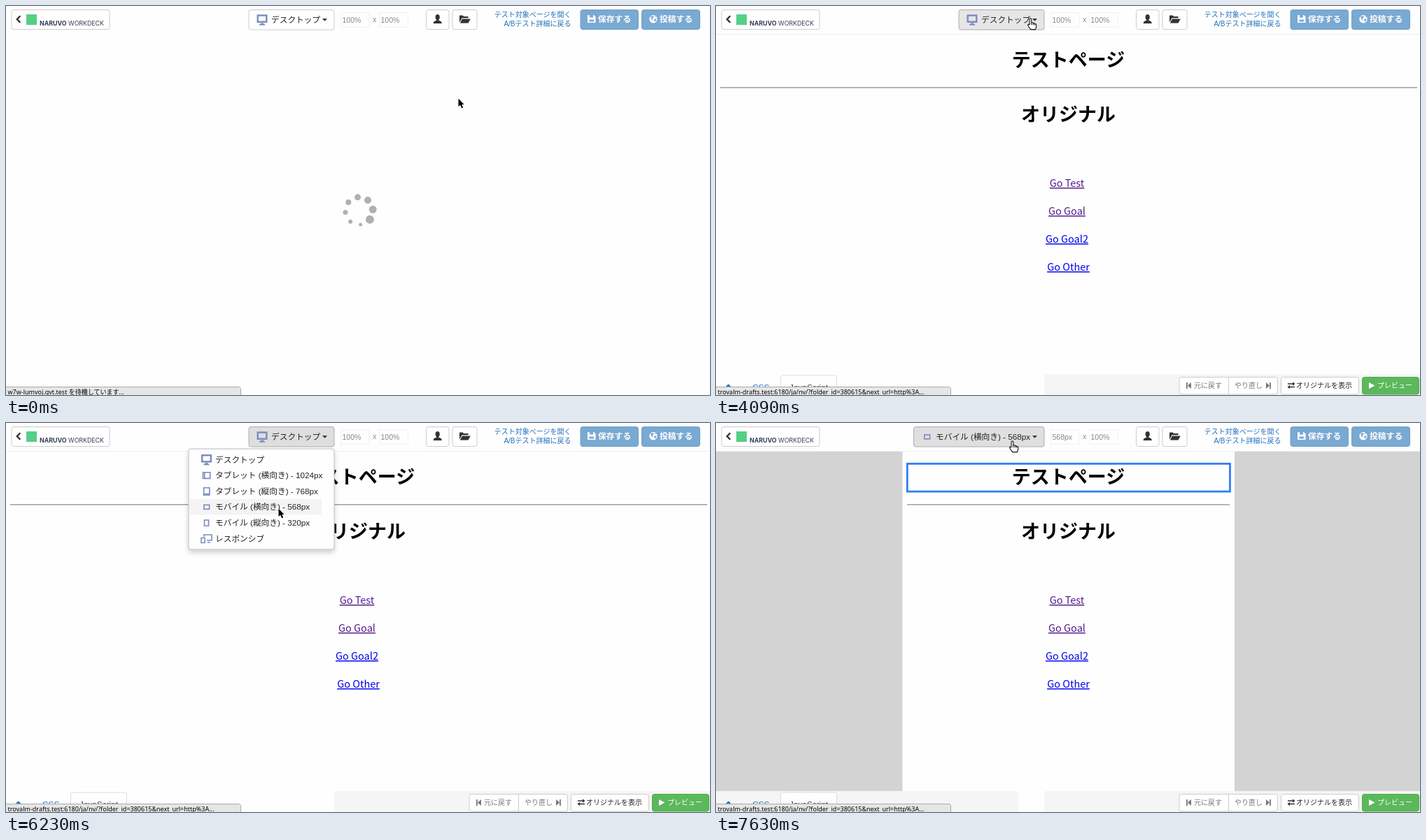
These frames come from a looping animation (1006 by 557 pixels, 8000 ms). An HTML page:

```html
<!DOCTYPE html>
<html lang="ja">
<head>
<meta charset="utf-8">
<title>Page editor</title>
<style>
  html, body { margin: 0; width: 100%; height: 100%; overflow: hidden; background: #fefefe; }
  svg { display: block; width: 1006px; height: 557px; }
  text { font-family: "Liberation Sans", "Noto Sans CJK JP", sans-serif; white-space: pre; }
  .btn { fill: #fff; stroke: #ccc; }
  .field { fill: #fefefe; stroke: #f1f1f1; }
  .num { font-size: 10.5px; fill: #888; }
  .label { font-size: 11.7px; fill: #222; }
  .nav { font-size: 10px; fill: #2171bb; text-anchor: end; }
  .main { font-size: 11.8px; font-weight: 700; fill: #fff; }
  .blue { fill: #7aa9d2; stroke: #6d9fca; }
  .small { font-size: 10px; fill: #222; }
  .dim { fill: #777; }
  .dark { fill: #333; }
  .tab { font-size: 11.8px; fill: #444; }
  .page text { font-family: "Noto Sans CJK JP", sans-serif; text-anchor: middle; }
  .page .head { font-size: 27px; font-weight: 700; }
  .link { font-size: 14.5px; text-decoration: underline 1px; text-underline-offset: 2px; fill: #0000ee; }
  .seen { fill: #551a8b; }
  .dev { fill: none; stroke: #7a8bbd; stroke-width: 1.6; }
  #statusText { font: 500 9px "Noto Sans", "Noto Sans CJK JP", sans-serif; }
</style>
</head>
<body>
<svg viewBox="0 0 1006 557">
  <defs>
    <g id="monitor" class="dev">
      <rect x="1.2" y="1.2" width="12.6" height="9.2" stroke-width="2.4"/>
      <path d="M5.2 12.2h4.6v2.2H5.2z" fill="#7a8bbd" stroke="none"/>
      <path d="M3.5 14.5h8"/>
    </g>
    <rect id="wide" class="dev" x=".8" y=".8" width="7.8" height="6"/>
    <filter id="shade" x="-10%" y="-10%" width="120%" height="125%">
      <feDropShadow dx="0" dy="4" stdDeviation="3.5" flood-opacity=".18"/>
    </filter>
  </defs>

  <g id="sides" fill="#d3d3d3">
    <rect y="41" width="266.5" height="486"/>
    <rect x="741" y="41" width="265" height="486"/>
  </g>

  <g id="page" class="page">
    <text class="head" x="503.5" y="87">テストページ</text>
    <rect id="rule" y="116.2" height="1.3" fill="#8f8f8f"/>
    <text class="head" x="503.5" y="165">オリジナル</text>
    <text class="link seen" x="501.5" y="259">Go Test</text>
    <text class="link seen" x="501.5" y="299">Go Goal</text>
    <text class="link" x="501.5" y="339">Go Goal2</text>
    <text class="link" x="503.5" y="379">Go Other</text>
  </g>
  <rect id="pick" x="273.3" y="58.3" width="461.2" fill="none" stroke="#2f7ff3" stroke-width="2.8"/>
  <g id="spinner" opacity=".3"></g>

  <!-- top bar -->
  <path id="topLine" d="M0 40.5H1006" stroke="#eee"/>
  <rect class="btn" x="8" y="5.5" width="140" height="28" rx="3"/>
  <path d="M20.3 14.2L15.8 19l4.5 4.8" fill="none" stroke="#333" stroke-width="2.4"/>
  <rect x="29" y="12" width="15" height="15" fill="#55cf86"/>
  <text x="48" y="27.5" fill="#343c58" style="font:8.8px Inter,sans-serif"><tspan font-weight="700">NARUVO</tspan> WORKDECK</text>

  <rect id="device" class="btn" y="5.5" height="28.5" rx="3"/>
  <g id="desktopLabel">
    <use href="#monitor" x="358.5" y="12.3"/>
    <text class="label" x="379" y="24">デスクトップ</text>
  </g>
  <g id="mobileLabel">
    <use href="#wide" x="297" y="16"/>
    <text class="label" x="314" y="24">モバイル (横向き) - 568px</text>
  </g>
  <path class="dark" d="M452 18h7l-3.5 3.7z"/>

  <rect class="field" x="478.5" y="9.5" width="40.5" height="20.5"/>
  <text id="widthText" class="num" x="480.5" y="23.7"></text>
  <text class="num" x="524" y="23.2">x</text>
  <rect class="field" x="533.5" y="9.5" width="41" height="20.5"/>
  <text class="num" x="535.5" y="23.7">100%</text>

  <rect class="btn" x="600.5" y="5.5" width="32.5" height="28" rx="3"/>
  <rect class="btn" x="638" y="5.5" width="35" height="28" rx="3"/>
  <g class="dark">
    <ellipse cx="616.7" cy="16" rx="3.1" ry="4"/>
    <path d="M610.6 25q0-3.6 4.6-4.6v-2h3v2q4.6 1 4.6 4.6z"/>
    <path d="M648 23.5V13.5h5l1 1.5h6.5v2.2h-9z"/>
    <path d="M648.8 24.5l3-6h12l-3.4 6z"/>
  </g>
  <text class="nav" x="807.5" y="15.6">テスト対象ページを開く</text>
  <text class="nav" x="807.5" y="29">A/Bテスト詳細に戻る</text>

  <rect class="blue" x="821" y="5.5" width="82.5" height="28" rx="3"/>
  <path d="M831 13h9l2.5 2.5v8.5h-11.5z" fill="#fff"/>
  <path d="M834 13h5v3.5h-5zM833.5 19.5h6.5v3h-6.5z" fill="#7aa9d2"/>
  <text class="main" x="846" y="23">保存する</text>
  <rect class="blue" x="908.5" y="5.5" width="83" height="28" rx="3"/>
  <circle cx="925" cy="18.7" r="5.7" fill="#fff"/>
  <path d="M921 15l4-.8 1 2-2.5 1.3 1 2-1.5 1zM926 19l3-1 .5 2-2.5 2.7zM927 14l2.3 1.5-1 1z" fill="#7aa9d2"/>
  <text class="main" x="934" y="23">投稿する</text>

  <!-- bottom bar -->
  <g id="bottom">
    <rect id="barLeft" y="527" height="30" fill="#f5f5f5"/>
    <rect x="469" y="527" width="537" height="30" fill="#f5f5f5"/>
    <path d="M13 547.5l4.7-4.5 4.7 4.5" fill="none" stroke="#2171bb" stroke-width="2.4"/>
    <text class="tab" x="52" y="549.5" style="fill:#2171bb">CSS</text>
    <path d="M92.5 558V532q0-3 3-3H169.5q3 0 3 3V558z" fill="#fefefe" stroke="#ddd"/>
    <text class="tab" x="105" y="549.5">JavaScript</text>

    <rect class="btn" x="662" y="531.5" width="140.5" height="24.5" rx="3"/>
    <path d="M732.5 531.5v24.5" stroke="#ccc"/>
    <path class="dim" d="M672 539h1.8v9H672zM679 539v9l-5-4.5zM786 539v9l5-4.5zM791 539h1.8v9H791z"/>
    <text class="small dim" x="683" y="547.3">元に戻す</text>
    <text class="small dim" x="741" y="547.3">やり直し</text>
    <rect class="btn" x="807.5" y="531.5" width="111" height="24.5" rx="3"/>
    <path class="dark" d="M817 540.2h7v-2l3.5 2.8-3.5 2.8v-2h-7zM827 544.7h-7v-2l-3.5 2.8 3.5 2.8v-2h7z"/>
    <text class="small" x="829" y="547.3">オリジナルを表示</text>
    <rect x="923.5" y="531.5" width="81" height="24.5" rx="3" fill="#5cb85c" stroke="#4cae4c"/>
    <path d="M933 539v9l8.5-4.5z" fill="#fff"/>
    <text class="small" x="945" y="547.3" style="fill:#fff">プレビュー</text>
  </g>

  <g id="menu">
    <rect x="261" y="37" width="208" height="144" rx="3" fill="#fefefe" stroke="#bbb" filter="url(#shade)"/>
    <rect id="hover" x="262" width="189" height="22.6" fill="#f4f4f4"/>
    <use href="#monitor" x="279" y="45"/>
    <g class="dev">
      <path d="M281.5 70.8h10.2v8.6h-10.2zM283.7 71v8.4"/>
      <path d="M282.6 92.8h8.2v10.4h-8.2zM282.6 101.5h8.2"/>
      <path d="M283.5 139h6v8.2h-6z"/>
      <path d="M283 163v-3h11v8h-7M279 164.5h5v7h-5zM288 171h4"/>
    </g>
    <use href="#wide" x="282" y="116.5"/>
  </g>

  <g id="status">
    <path d="M-1 558V545.5H332.5q3 0 3 3V558z" fill="#e6e6e6" stroke="#aaa"/>
    <text id="statusText" x="2.5" y="555.5"></text>
  </g>

  <g id="cursor">
    <path id="arrow" d="M0 0V11.5L2.6 9.2 4.6 13.8 6.7 12.9 4.8 8.4H8Z" stroke="#fff" paint-order="stroke"/>
    <path id="hand" d="M-1.5 8.5V1.2a1.4 1.4 0 0 1 2.8 0V5.5l2.2.3.4.8 2 .1.5.9 1.5.4.3 1.2V12l-1.3 3.6H.3L-3 11.3l-.9-2.3 1-.8zM1.3 6v3M3.8 6.6v2.6M6 7.4v2" fill="#fff" stroke="#111" stroke-width="1.1"/>
  </g>
</svg>
<script>
const LOOP = 8000;
const WAITING = "w7w-lumvoj.qvt.test を待機しています...";
const ADDRESS = "trovalm-drafts.test:6180/ja/nv/?folder_id=380615&next_url=http%3A...";
const ITEMS = ["デスクトップ", "タブレット (横向き) - 1024px", "タブレット (縦向き) - 768px",
  "モバイル (横向き) - 568px", "モバイル (縦向き) - 320px", "レスポンシブ"];
const ROW = 22.6, MENU_TOP = 41;
const TICKS = [0, 120, 330, 450, 600, 720, 870, 1050];
// start, step length, steps, end x, end y
const MOVES = [
  [2160, 1, 1, 564.5, 115.5], [2340, 87.5, 9, 449.5, 18], [4890, 100, 7, 389.5, 122.5],
  [6820, 1, 1, 393, 92.5], [6970, 1, 1, 398.5, 83.5], [7120, 1, 1, 403, 53.5], [7270, 90, 5, 423.5, 26]
];

const $ = id => document.getElementById(id);
const show = (id, on) => { $(id).style.display = on ? "" : "none"; };
const set = (id, attrs) => { for (const k in attrs) $(id).setAttribute(k, attrs[k]); };
function add(parent, tag, attrs, text = "") {
  const el = document.createElementNS($(parent).namespaceURI, tag);
  for (const k in attrs) el.setAttribute(k, attrs[k]);
  el.textContent = text;
  $(parent).append(el);
}

ITEMS.forEach((text, i) => add("menu", "text", { class: "label", x: 299, y: 56.6 + ROW * i }, text));
for (let i = 0; i < 8; i++) {
  const a = (39 - 45 * i) * Math.PI / 180;
  add("spinner", "circle", { cx: 504.6 + 19.7 * Math.cos(a), cy: 293.4 + 19.7 * Math.sin(a), r: 6 - i / 2 });
}

function pointer(t) {
  let x = 646.5, y = 132.5;
  for (const [start, gap, steps, endX, endY] of MOVES) {
    if (t < start) break;
    const k = Math.min(1, (Math.floor((t - start) / gap) + 1) / steps);
    const e = k * k * (3 - 2 * k);
    x += (endX - x) * e;
    y += (endY - y) * e;
  }
  return [x, y];
}

function buttonColours(t, again) {
  if (again) return ["#dfdfdf", "#adadad"];
  if (t < 4090 || t >= 6350) return ["#fff", "#ccc"];
  if (t < 4280) return ["#e6e6e6", "#adadad"];
  return t < 6230 ? ["#cdcdcd", "#8c8c8c"] : ["#dedede", "#adadad"];
}

function draw(t) {
  const [x, y] = pointer(t);
  const onButton = y < 36;
  const ready = t >= 1200, mobile = t >= 6350;
  const opened = t >= 4280 && !mobile;
  const again = t >= 7270 && onButton;

  const tick = TICKS.filter(s => s <= t).pop();
  set("spinner", { transform: `rotate(${tick * 0.18} 503.8 292)` });
  show("spinner", !ready);

  show("page", t >= 1050);
  set("page", { opacity: ready ? 1 : 0.5, transform: `translate(0 ${ready ? 0 : 1})` });
  set("rule", mobile ? { x: 273, width: 461 } : { x: 6, width: 996 });
  show("topLine", ready);
  show("bottom", ready);
  set("barLeft", { width: t < 4090 ? 469 : t < 6820 ? 0 : 432 });

  show("sides", mobile);
  show("pick", mobile);
  set("pick", { height: t < 6970 ? 335.5 : 39.8 });

  set("device", mobile ? { x: 282.5, width: 186.5 } : { x: 347, width: 122 });
  [$("device").style.fill, $("device").style.stroke] = buttonColours(t, again);
  show("desktopLabel", !mobile);
  show("mobileLabel", mobile);
  $("widthText").textContent = mobile ? "568px" : "100%";

  const row = Math.floor((y - MENU_TOP) / ROW);
  show("menu", opened);
  show("hover", row >= 0 && row < ITEMS.length);
  set("hover", { y: MENU_TOP + row * ROW });

  show("status", t < 720 || (t >= 4090 && t < 6640) || again);
  $("statusText").textContent = t < 720 ? WAITING : ADDRESS;

  set("cursor", { transform: `translate(${x} ${y})` });
  show("hand", onButton);
  show("arrow", !onButton);
}

const begin = performance.now();
function frame() {
  draw((performance.now() - begin) % LOOP);
  requestAnimationFrame(frame);
}
frame();
</script>
</body>
</html>
```
